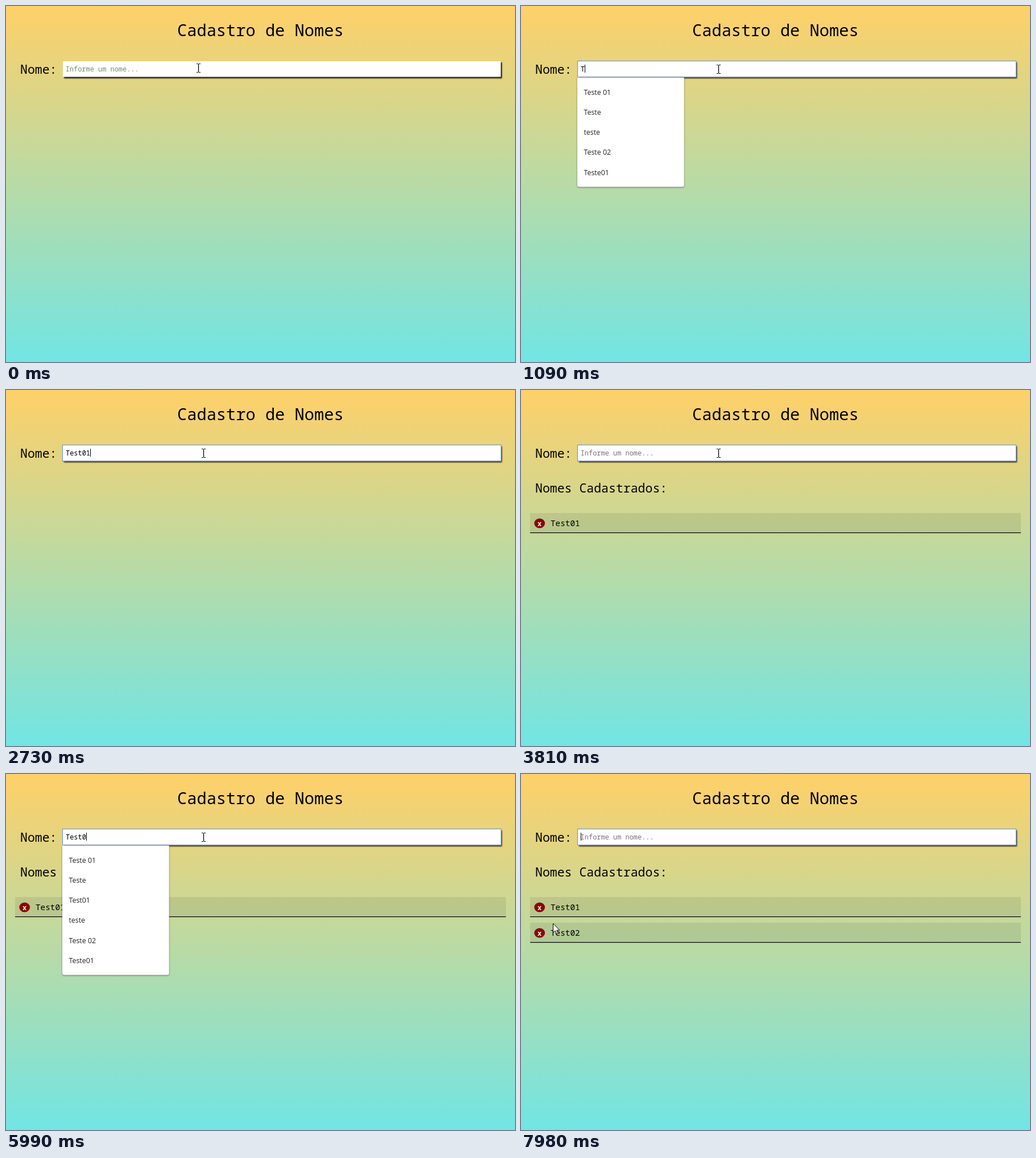
An HTML page with a canvas that plays this animation: 895 px wide and 625 px high, repeating every 8 s.

```html
<!DOCTYPE html>
<html lang="pt-BR">
<head>
<meta charset="utf-8">
<title>Cadastro de Nomes</title>
<style>
  html, body { margin: 0; width: 100%; height: 100%; overflow: hidden; }
  canvas { display: block; }
</style>
</head>
<body>
<canvas id="stage" width="895" height="625"></canvas>
<script>
const ctx = document.getElementById('stage').getContext('2d');
const LOOP = 8000, BLINK = 540;
const MONO = '"Noto Sans Mono", monospace', SANS = '"Open Sans", sans-serif';

// [time, field content]; every entry restarts the caret blink
const typing = [
  [160, ''], [1090, 'T'], [1400, 'Te'], [1560, 'Tes'], [1720, 'Test'],
  [2570, 'Test0'], [2730, 'Test01'], [3190, ''], [3270, ''],
  [4660, 'T'], [5050, 'Te'], [5210, 'Tes'], [5450, 'Test'],
  [5990, 'Test0'], [6230, 'Test02'], [6700, '']
];
const firstList = ['Teste 01', 'Teste', 'teste', 'Teste 02', 'Teste01'];
const secondList = ['Teste 01', 'Teste', 'Test01', 'teste', 'Teste 02', 'Teste01'];

// [time, suggestions, opacity, inset]
const popups = [
  [1090, firstList, 1, 0], [2570, firstList, .85, 1], [2650, firstList, .3, 3], [2730],
  [4740, secondList, 1, 0], [6070, ['Test01'], 1, 0],
  [6230, ['Test01'], .85, 1], [6310, ['Test01'], .3, 3], [6390]
];

const latest = (events, t) => events.filter(e => e[0] <= t).pop();

function rect(x, y, w, h, color) {
  ctx.fillStyle = color;
  ctx.fillRect(x, y, w, h);
}

function text(str, x, y, size, color = '#000', family = MONO) {
  ctx.font = `${size}px ${family}`;
  ctx.fillStyle = color;
  ctx.fillText(str, x, y);
}

function shadow(x, y, blur, color) {
  ctx.shadowOffsetX = x;
  ctx.shadowOffsetY = y;
  ctx.shadowBlur = blur;
  ctx.shadowColor = color;
}

function drawPage() {
  const sky = ctx.createLinearGradient(0, 0, 0, 625);
  sky.addColorStop(0, '#ffd068');
  sky.addColorStop(1, '#71e5e4');
  rect(0, 0, 895, 625, sky);
  text('Cadastro de Nomes', 301, 53, 28.7);
  text('Nome:', 25, 118.5, 21.5);
}

function drawItem(name, y) {
  rect(16, y, 863, 34, 'rgba(0,0,0,.08)');
  rect(16, y + 34, 863, 1.2, '#000');
  ctx.fillStyle = '#8b0000';
  ctx.beginPath();
  ctx.ellipse(32.7, y + 18, 9.4, 8.6, 0, 0, Math.PI * 2);
  ctx.fill();
  ctx.textAlign = 'center';
  ctx.font = `bold 12px ${MONO}`;
  ctx.fillStyle = '#fff';
  ctx.fillText('x', 32.7, y + 22.5);
  ctx.textAlign = 'left';
  text(name, 52, y + 23, 14.35);
}

function drawField(t) {
  const entry = latest(typing, t);
  ctx.save();
  shadow(2, 2, 2, 'rgba(0,0,0,.9)');
  rect(100, 97, 770, 27.5, '#fff');
  ctx.restore();
  if (entry) {
    ctx.strokeStyle = '#6b9cd6';
    ctx.lineWidth = 1.2;
    ctx.strokeRect(99.5, 96.5, 771, 28.5);
  }
  const value = entry ? entry[1] : '';
  if (value) text(value, 105, 115, 11.95);
  else text('Informe um nome...', 104.7, 115, 11.95, entry ? '#757575' : '#6f9468');
  if (entry && (t - entry[0]) % (2 * BLINK) < BLINK)
    rect(Math.round(105 + 7.17 * value.length), 103, 1, 14, '#000');
}

function drawPopup(t) {
  const [, names, alpha, inset] = latest(popups, t) || [];
  if (!names) return;
  ctx.save();
  ctx.globalAlpha = alpha;
  const left = 99 + inset, top = 125.5 + inset * .6;
  ctx.fillStyle = '#fff';
  ctx.beginPath();
  ctx.roundRect(left, top, 187.7 - inset * .6, 16 + names.length * 35.2, [0, 0, 3, 3]);
  shadow(0, 1, 3, 'rgba(0,0,0,.45)');
  ctx.fill();
  shadow(0, 0, 0, 'transparent');
  names.forEach((name, i) =>
    text(name, left + 11.5, top + 30.3 + i * 35.2, 12.4, '#202124', SANS));
  ctx.restore();
}

function drawBeam(x, y) {
  rect(x - .65, y - 7, 1.3, 14, '#000');
  for (const dy of [-8, 7]) {
    rect(x - 3.5, y + dy, 3, 1, '#000');
    rect(x + .5, y + dy, 3, 1, '#000');
  }
}

function drawArrow(x, y) {
  ctx.save();
  ctx.translate(x + .5, y + .5);
  ctx.fillStyle = '#fff';
  ctx.strokeStyle = '#000';
  ctx.lineWidth = 1;
  ctx.stroke(new Path2D());
  const shape = new Path2D('M0 0V16L3.7 12.6L6.3 18.6L8.8 17.5L6.2 11.7H11.3Z');
  ctx.fill(shape);
  ctx.stroke(shape);
  ctx.restore();
}

function drawPointer(t) {
  if (t < 470) return drawBeam(338.5, 109);
  if (t < 7710) return drawBeam(347.5, 111);
  const step = Math.min(4, Math.floor((t - 7710) / 90) + 1);
  const p = 1 - (1 - step / 4) ** 2;
  drawArrow(Math.round(347 - 291 * p), Math.round(111 + 151 * p));
}

function draw(now) {
  const t = now % LOOP;
  drawPage();
  if (t >= 3190) {
    text('Nomes Cadastrados:', 25, 180, 21.5);
    drawItem('Test01', 216);
  }
  if (t >= 6700) drawItem('Test02', 261);
  drawField(t);
  drawPopup(t);
  drawPointer(t);
}

const start = performance.now();
function frame() {
  draw(performance.now() - start);
  requestAnimationFrame(frame);
}
frame();
</script>
</body>
</html>
```
